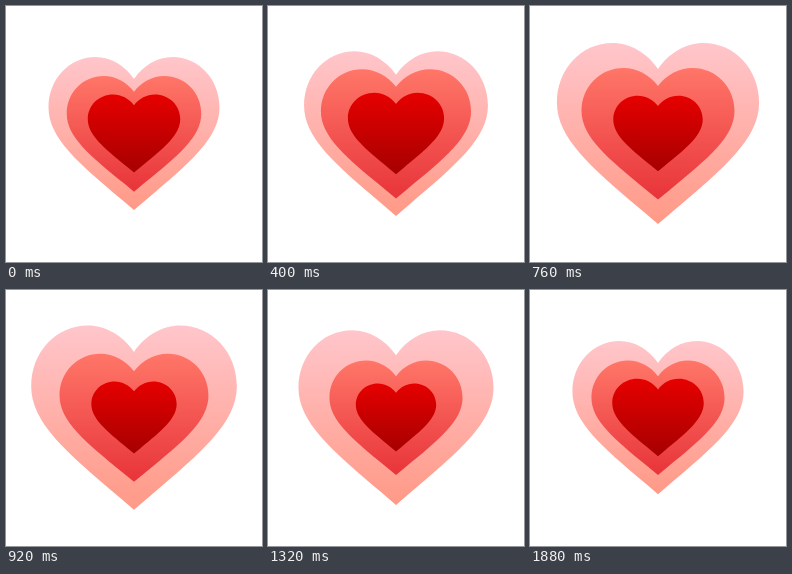
Recreate the animation shown at these times as an HTML page. Size 256 by 256 pixels, loop 1920 ms.

```html
<!DOCTYPE html>
<html lang="en">
<head>
<meta charset="utf-8">
<title>Beating heart</title>
<style>
  html, body { margin: 0; height: 100%; overflow: hidden; background: #fff; }
  svg { display: block; width: 100vw; height: 100vh; }
</style>
</head>
<body>
<svg id="stage" viewBox="0 0 256 256"></svg>
<script>
const LOOP = 1920, STEP = 40;
const NS = "http://www.w3.org/2000/svg";
const stage = document.getElementById("stage");

// half = mean half width, swing = its change, peak = time of the largest size;
// top, low, dip = proportions relative to the half width
const hearts = [
  { half: 94.2, swing: 8.7, peak: 960, y: 127.6, top: .59, low: 1.2, dip: .256, from: "#ffc6cb", to: "#ff9986" },
  { half: 70.5, swing: 6.5, peak: 640, y: 127.8, top: .56, low: 1.16, dip: .235, from: "#ff7668", to: "#e8343a" },
  { half: 44.2, swing: 4.05, peak: 320, y: 127.5, top: .53, low: 1.16, dip: .232, from: "#e60000", to: "#a60000" }
];

function add(parent, tag, attrs) {
  const el = document.createElementNS(NS, tag);
  for (const key in attrs) el.setAttribute(key, attrs[key]);
  return parent.appendChild(el);
}

// Heart of half width 1, centred on its bounding box
function heartPath({ top, low, dip }) {
  const mid = (top - low) / 2;
  const p = (x, y) => `${x} ${y + mid} `;
  return "M" + p(0, low) +
    "L" + p(-.145, low * .897) +
    "C" + p(-.66, low * .534) + p(-1, low * .294) + p(-1, 0) +
    "C" + p(-1, -top * .56) + p(-.758, -top) + p(-.45, -top) +
    "C" + p(-.276, -top) + p(-.109, dip * .38 - top) + p(0, dip - top) +
    "C" + p(.109, dip * .38 - top) + p(.276, -top) + p(.45, -top) +
    "C" + p(.758, -top) + p(1, -top * .56) + p(1, 0) +
    "C" + p(1, low * .294) + p(.66, low * .534) + p(.145, low * .897) + "Z";
}

hearts.forEach((heart, i) => {
  const fill = add(stage, "linearGradient", { id: "fill" + i, x1: 0, y1: 0, x2: 0, y2: 1 });
  add(fill, "stop", { offset: 0, "stop-color": heart.from });
  add(fill, "stop", { offset: 1, "stop-color": heart.to });
  heart.el = add(stage, "path", { d: heartPath(heart), fill: `url(#fill${i})` });
});

function draw(time) {
  const t = Math.floor((time % LOOP) / STEP) * STEP;
  for (const { el, half, swing, peak, y } of hearts) {
    const size = half + swing * Math.cos((t - peak) / LOOP * 2 * Math.PI);
    el.setAttribute("transform", `translate(128 ${y}) scale(${size})`);
  }
}

function tick() {
  draw(performance.now());
  requestAnimationFrame(tick);
}
draw(0);
requestAnimationFrame(tick);
</script>
</body>
</html>
```
